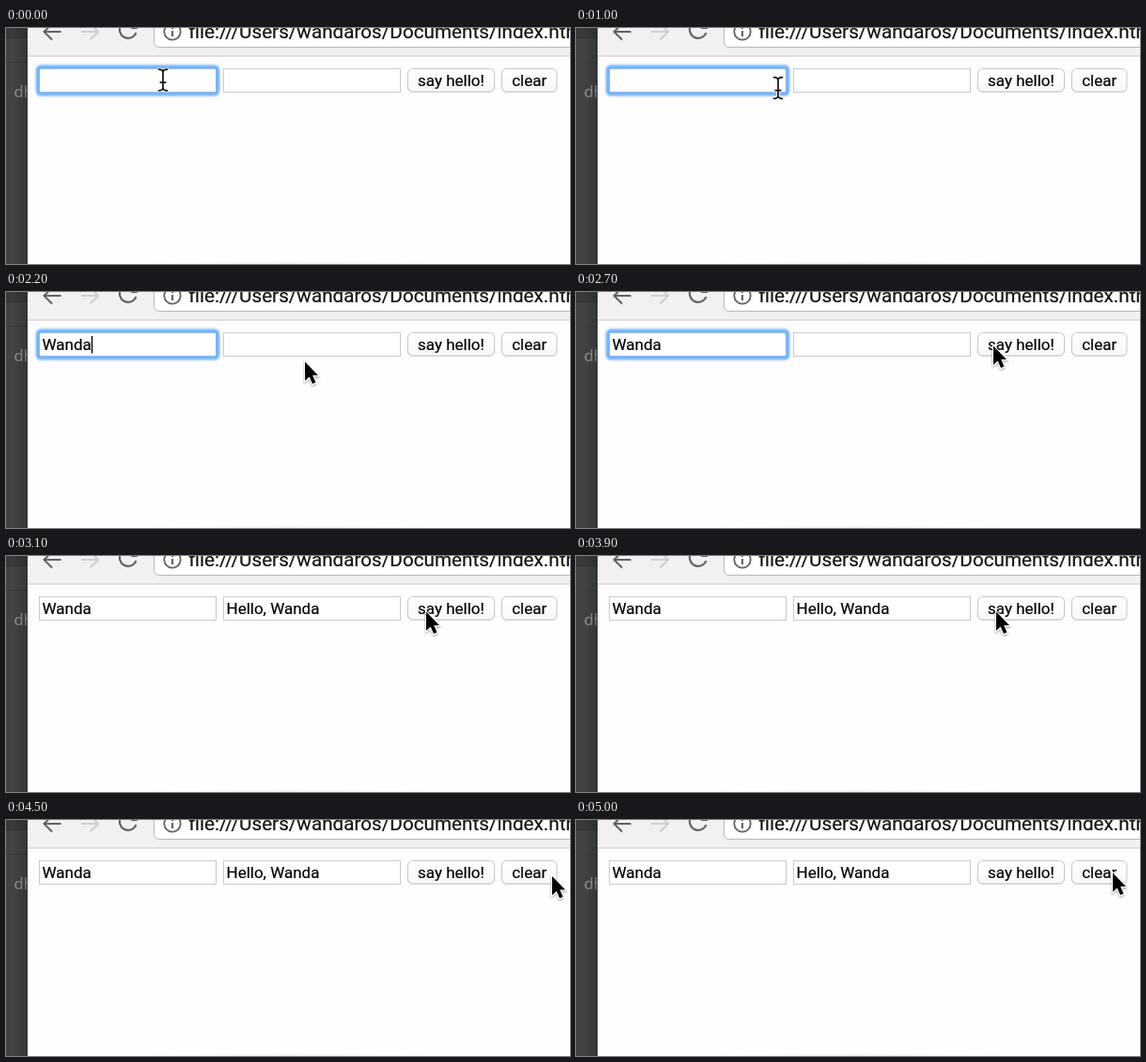
An HTML page that plays this animation: 600 px wide and 252 px high, repeating every 5.1 s.

```html
<!DOCTYPE html>
<html lang="en">
<head>
<meta charset="utf-8">
<title>Say hello form</title>
<style>
  html, body { margin: 0; width: 100%; height: 100%; overflow: hidden; background: #fefdff; }
  svg { display: block; width: 100vw; height: 100vh; }
  text { font-family: Roboto, Inter, sans-serif; font-size: 17px; fill: #000; stroke: #000; stroke-width: .2; white-space: pre; }
  .url { font-size: 20.7px; fill: #141415; }
  .code { font-family: "Noto Sans Mono", "DejaVu Sans Mono", monospace; fill: #8b9096; stroke: none; }
  .icon { fill: none; stroke: #626164; stroke-width: 2.1; }
  .field { fill: #fff; stroke: #c9c9cf; }
  .button { fill: url(#face); stroke: #c6c6c9; }
</style>
</head>
<body>
<svg viewBox="0 0 600 252" preserveAspectRatio="none">
  <defs>
    <linearGradient id="edge">
      <stop offset="0" stop-color="#000" stop-opacity="0"/>
      <stop offset="1" stop-color="#000" stop-opacity=".2"/>
    </linearGradient>
    <linearGradient id="face" x2="0" y2="1">
      <stop offset="0" stop-color="#fff"/>
      <stop offset="1" stop-color="#f8f8f9"/>
    </linearGradient>
    <radialGradient id="haze">
      <stop offset="0" stop-color="#777" stop-opacity=".15"/>
      <stop offset="1" stop-color="#777" stop-opacity="0"/>
    </radialGradient>
    <filter id="soft" x="-10%" y="-50%" width="120%" height="200%"><feGaussianBlur stdDeviation="1"/></filter>
    <filter id="drop" x="-50%" y="-50%" width="200%" height="200%">
      <feDropShadow dx="0" dy="1.5" stdDeviation="1.2" flood-opacity=".35"/>
    </filter>
    <path id="beam" d="M-4.5 -11.3Q-.6 -11.3 0 -8.6Q.6 -11.3 4.5 -11.3M0 -8.6V8.6M-4.5 11.3Q-.6 11.3 0 8.6Q.6 11.3 4.5 11.3M-2.8 2.6H2.8"/>
    <path id="leftward" d="M18.5 4H1M9 -4.5L.5 4L9 12.5"/>
  </defs>

  <!-- editor behind the window -->
  <rect width="24" height="252" fill="#424345"/>
  <rect width="24" height="10" fill="#38393b"/>
  <rect y="10" width="24" height="1" fill="#303133"/>
  <rect y="36" width="24" height="1" fill="#393a3c"/>
  <text class="code" x="8.5" y="74">dh</text>
  <rect x="8" width="15" height="252" fill="url(#edge)"/>

  <!-- browser window -->
  <rect x="23" width="577" height="252" fill="#fefdff"/>
  <rect x="23" width="577" height="30" fill="#f2f0f3"/>
  <rect x="23" y="29.5" width="577" height="1" fill="#c9c6ca"/>
  <ellipse cx="300" cy="253" rx="180" ry="4" fill="url(#haze)"/>
  <use class="icon" href="#leftward" x="40"/>
  <use class="icon" href="#leftward" style="stroke:#d0ced2" transform="translate(98.5) scale(-1 1)"/>
  <path class="icon" d="M138.4 5A9 9 0 1 1 136.4 -4.4"/>
  <path d="M132.5 1H140V-6.5Z" fill="#626164"/>
  <rect x="157.5" y="-16" width="470" height="36.5" rx="5" fill="#fff" stroke="#b9b7bb"/>
  <circle class="icon" cx="177" cy="4" r="8.7" style="stroke-width:1.8"/>
  <path class="icon" d="M177 3V9M177 -1V1"/>
  <text class="url" x="194.5" y="11">file:///Users/wandaros/Documents/index.html</text>

  <!-- form -->
  <rect class="field" x="35.5" y="43.5" width="188" height="25"/>
  <rect class="field" x="231.5" y="43.5" width="188" height="25"/>
  <g id="ring">
    <rect x="34" y="41.7" width="191" height="28.6" rx="3" fill="none" stroke="#6eaff8" stroke-width="4.4" filter="url(#soft)"/>
    <rect x="36" y="44" width="187" height="24" fill="#fff"/>
  </g>
  <text id="name" x="38.5" y="62.3"></text>
  <text id="reply" x="234.5" y="62.3"></text>
  <rect id="caret" y="47" width="1.4" height="18.5"/>
  <g id="buttons"></g>

  <g id="ibeam" fill="none" stroke-linecap="round">
    <use href="#beam" stroke="#fff" stroke-width="3.6"/>
    <use href="#beam" stroke="#111" stroke-width="1.7"/>
  </g>
  <path id="arrow" d="M0 0V20.2L4.7 15.9L8 23.6L11.5 22.1L8.2 14.6H14Z" stroke="#fff" stroke-width="2" paint-order="stroke" filter="url(#drop)"/>
</svg>
<script>
  const LOOP = 5100, STEP = 100;
  const NAME = 'Wanda';
  const FIRST_KEY = 1500, ARROW = 2100, CLICK = 2900;
  const $ = id => document.getElementById(id);

  // each sweep eases out to (x, y); bow bends it down or, if negative, up
  const home = { x: 167, y: 55.5 };
  const sweeps = [
    { from: 0, to: 200, x: 215, y: 64, bow: 0 },
    { from: 1000, to: 1400, x: 213, y: 56, bow: 0 },
    { from: 1900, to: 2200, x: 318, y: 74.5, bow: 11 },
    { from: 2200, to: 2700, x: 444, y: 57.5, bow: -28 },
    { from: 2700, to: 2900, x: 447, y: 59.5, bow: 0 },
    { from: 3900, to: 4500, x: 581, y: 60, bow: -11.4 },
    { from: 4600, to: 4900, x: 571, y: 56.5, bow: 0 }
  ];

  const easeOut = k => 1 - (1 - k) ** 2;

  function pointer(t) {
    let { x, y } = home;
    for (const s of sweeps) {
      if (t < s.from) break;
      const k = Math.min(1, (t - s.from) / (s.to - s.from));
      x += (s.x - x) * easeOut(k);
      y += (s.y - y) * easeOut(k) + s.bow * Math.sin(Math.PI * k);
    }
    return `translate(${x} ${y})`;
  }

  const within = (t, from, to) => t >= from && t < to;
  const show = (id, on) => $(id).setAttribute('visibility', on ? 'visible' : 'hidden');

  function addButton(x, width, label) {
    $('buttons').insertAdjacentHTML('beforeend',
      `<rect x="${x}" y="44.8" width="${width}" height="24" rx="5" fill="#d2d2d5"/>
       <rect class="button" x="${x}" y="43.5" width="${width}" height="24.5" rx="5"/>
       <text x="${x + width / 2}" y="62.3" text-anchor="middle">${label}</text>`);
  }

  function draw(time) {
    const t = Math.floor(time % LOOP / STEP) * STEP;
    const typed = Math.max(0, Math.min(NAME.length, 1 + (t - FIRST_KEY) / STEP));
    const clicked = t >= CLICK;

    $('name').textContent = NAME.slice(0, typed);
    $('reply').textContent = clicked ? `Hello, ${NAME}` : '';
    show('ring', !clicked);

    const end = typed ? $('name').getComputedTextLength() : 0;
    $('caret').setAttribute('x', 38.5 + end);
    show('caret', within(t, 400, 600) || within(t, FIRST_KEY, 2400));

    // the pointer hides while typing
    const spot = pointer(t);
    for (const id of ['ibeam', 'arrow']) $(id).setAttribute('transform', spot);
    show('arrow', t >= ARROW);
    show('ibeam', t < FIRST_KEY || within(t, 2000, ARROW));
  }

  addButton(427.5, 92, 'say hello!');
  addButton(527.5, 58.5, 'clear');

  const start = performance.now();
  function tick() {
    draw(performance.now() - start);
    requestAnimationFrame(tick);
  }
  tick();
</script>
</body>
</html>
```
